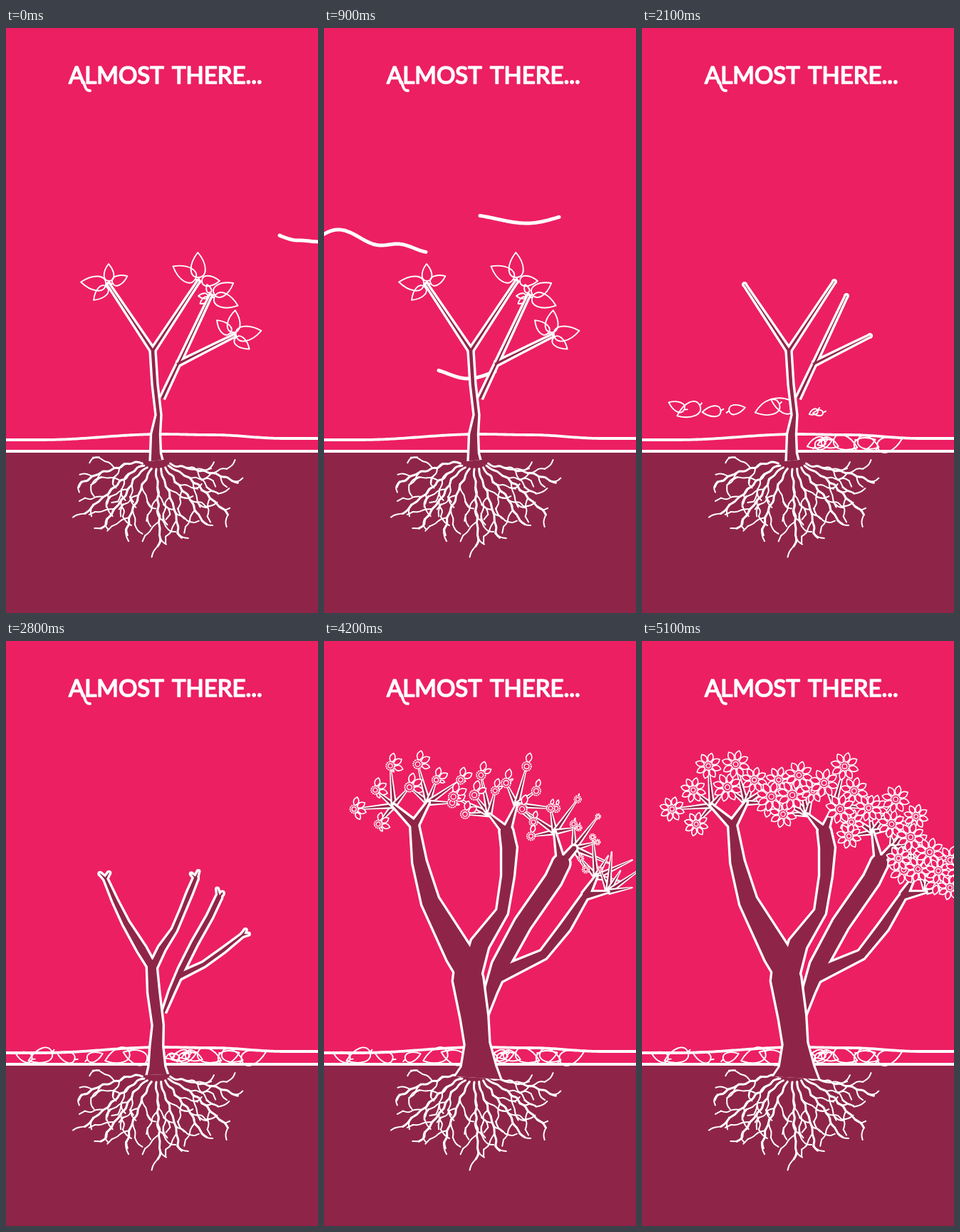
Recreate the animation shown at these times as an HTML page with a canvas. Size 438 px wide and 821 px high, loop 5200 ms.

```html
<!DOCTYPE html>
<html lang="en">
<head>
<meta charset="utf-8">
<title>Almost there</title>
<style>
html, body { margin: 0; width: 100%; height: 100%; overflow: hidden; background: #ec1f63; }
canvas { display: block; }
</style>
</head>
<body>
<canvas id="stage" width="438" height="821"></canvas>
<script>
const c = document.getElementById('stage').getContext('2d');
const PINK = '#ec1f63', SOIL = '#8e2549', WHITE = '#fff';
const LOOP = 5200, STEP = 100, LINE = 3.4, RAD = Math.PI / 180;

const clamp = v => Math.max(0, Math.min(1, v));
const span = (t, a, b) => clamp((t - a) / (b - a));
const lerp = (a, b, k) => a + (b - a) * k;
const mix = (a, b, k) => a.map((v, i) => lerp(v, b[i], k));
const ease = k => k * k * (3 - 2 * k);
const polar = ([x, y], a, d) => [x + Math.cos(a) * d, y + Math.sin(a) * d];

function random(seed) {
  return () => (seed = (seed * 16807) % 2147483647) / 2147483647;
}

function pen(w, color = WHITE) {
  c.lineWidth = w;
  c.strokeStyle = color;
}

function curve(pts) {
  c.beginPath();
  c.moveTo(...pts[0]);
  for (let i = 1; i < pts.length - 1; i++) {
    const [x, y] = pts[i], [nx, ny] = pts[i + 1];
    c.quadraticCurveTo(x, y, (x + nx) / 2, (y + ny) / 2);
  }
  c.lineTo(...pts[pts.length - 1]);
  c.stroke();
}

// ---- Tree: limbs are centre lines of [x, y, width] ----

const straight = (from, to, n) => Array.from({ length: n }, (_, i) => {
  const k = i / (n - 1);
  return [...mix(from, to, k), lerp(7, 4, k)];
});
const limb = (from, to, old) => ({ young: straight(from, to, old.length), old });

// A fork grows out of a limb's end; twigs fan around its tip
function fork({ young, old }, tip, heading, step) {
  const end = young[young.length - 1], root = old[old.length - 1];
  return { young: [end, end], old: [[root[0], root[1], 13], tip], heading, step };
}

const trunk = {
  young: [[211, 607, 18], [210, 597, 15], [210, 570, 13], [214, 543, 8], [209, 500, 8], [206, 453, 8]],
  old: [[216, 613, 66], [217, 597, 50], [215, 565, 36], [211, 528, 40], [202, 474, 44], [200, 452, 34]]
};
const left = limb([206, 453], [144, 360],
  [[205, 475, 30], [190, 440, 40], [149, 365, 27], [134, 310, 21], [127, 258, 13]]);
const right = limb([206, 453], [270, 356],
  [[205, 475, 30], [219, 425, 28], [250, 380, 18], [258, 330, 19], [260, 290, 23], [256, 267, 20]]);
const side = limb([219, 520], [287, 376],
  [[228, 526, 5], [234, 492, 19], [247, 456, 25], [279, 397, 26], [322, 335, 26], [333, 312, 26]]);
const offshoot = limb([240, 472], [320, 432],
  [[243, 470, 22], [308, 440, 15], [339, 401, 17], [367, 357, 11]]);

const sideForks = [
  fork(side, [324, 268, 3], -100, 45), fork(side, [351, 291, 10], -15, 38),
  fork(offshoot, [382, 331, 4], -60, 35), fork(offshoot, [399, 352, 2], -60, 25)
];
const mainForks = [
  fork(left, [98, 231, 5], -140, 45), fork(left, [146, 227, 5], -70, 35),
  fork(right, [232, 243, 2], -128, 26), fork(right, [270, 230, 2], -35, 40)
];

// Five twigs per fork, alternately short and long, each ending in a flower
const rnd = random(77);
const twigs = [...mainForks, ...sideForks].flatMap(({ old, heading, step }) =>
  [-2, -1, 0, 1, 2].map(j => ({
    base: old[1].slice(0, 2),
    tip: polar(old[1], (heading + j * step) * RAD, j % 2 ? 56 : 34),
    r: 17 + rnd() * 4
  })));

function taper(pts, extra) {
  const half = p => Math.max(0, p[2] + extra) / 2;
  const edge = s => pts.map((p, i) => {
    const a = pts[Math.max(0, i - 1)], b = pts[Math.min(pts.length - 1, i + 1)];
    return polar(p, Math.atan2(b[1] - a[1], b[0] - a[0]) + s * Math.PI / 2, half(p));
  });
  const end = pts[pts.length - 1];
  c.beginPath();
  [...edge(1), ...edge(-1).reverse()].forEach(p => c.lineTo(...p));
  c.fill();
  c.beginPath();
  c.arc(end[0], end[1], half(end), 0, 7);
  c.fill();
}

// White silhouette first, then the wood inside, so joined limbs share one outline
function wood(parts, k) {
  const shapes = parts.map(p => p.young.map((v, i) => mix(v, p.old[i], k)));
  for (const [color, extra] of [[WHITE, LINE], [SOIL, -LINE]]) {
    c.fillStyle = color;
    shapes.forEach(s => taper(s, extra));
  }
}

function drawTwig({ base, tip }, k) {
  const end = mix(base, tip, k);
  for (const [color, w] of [[WHITE, 9], [SOIL, 4]]) {
    c.fillStyle = color;
    taper([[...base, w], [...end, color === WHITE ? 2.4 : 0]], 0);
  }
}

// ---- Roots: seeded, wandering and branching ----

const roots = [];
(function growRoots() {
  const rand = random(4242);
  function root(start, aim, len, w, depth) {
    const pts = [start];
    let p = start;
    for (let d = 0, i = 1; d < len; d += 9, i++) {
      const turn = (i % 2 ? 1 : -1) * (0.15 + rand() * 0.45);
      p = polar(p, aim + turn, 9);
      pts.push(p);
      aim = lerp(aim, Math.PI / 2, 0.025);
      if (depth < 2 && i > 2 && i % 2) {
        const out = (i % 4 === 1 ? 1 : -1) * (0.5 + rand() * 0.3);
        root(p, aim + out, (len - d) * 0.3 + 8, 2, depth + 1);
      }
    }
    roots.push({ pts, w });
  }
  const n = 9;
  for (let i = 0; i < n; i++) {
    const a = lerp(168, 12, i / (n - 1)) * RAD;
    const start = [211 + Math.cos(a) * 20, 609 + Math.sin(a) * 10];
    root(start, a, 104 + rand() * 14, 3, 0);
  }
})();

function drawRoots() {
  roots.forEach(({ pts, w }) => {
    pen(w);
    curve(pts);
  });
}

// ---- Leaves: clusters of [direction, length, landing x] ----

const clusters = [
  [[145, 360], [[185, 35, 48], [-92, 24, 25], [-25, 23, 125], [135, 26, 84]]],
  [[270, 355], [[-150, 36, 156], [-91, 35, 181], [0, 25, 255]]],
  [[288, 376], [[-30, 31, 313], [20, 35, 286], [180, 13, 230], [145, 14, 236], [-110, 12, 252]]],
  [[318, 432], [[-135, 26, 244], [-84, 31, 318], [-10, 36, 348], [38, 25, 264]]]
];
const leaves = clusters.flatMap(([tip, list]) =>
  list.map(([dir, len, land], i) => ({ tip, dir, len, land, flip: i % 2 ? 20 : -20 })));

function drawLeaf({ tip, dir, len, land, flip }, t) {
  // the stalk loosens and the leaf sags, then drops; the right-hand ones land first
  const down = Math.sign(Math.cos(dir * RAD));
  const sag = span(t, 1100, 1400);
  const fall = span(t, 1400, land > 240 ? 2100 : 2300);
  const hung = dir + down * 45 * sag;
  const [hx, hy] = polar(tip, hung * RAD, len / 2 + 5 + 3 * sag);
  const lie = (down < 0 ? 180 : 0) + flip;
  const turn = ((lie - hung + 540) % 360 + 360) % 360 - 180;
  const h = len / 2, w = len * 0.57;

  c.save();
  c.translate(lerp(hx, land, fall), lerp(hy, 583, fall));
  c.rotate((hung + turn * fall) * RAD);
  pen(1.9);
  c.beginPath();
  c.moveTo(-h - 4, 2);
  c.lineTo(-h, 0);
  c.bezierCurveTo(-h, -w * 0.7, len * 0.05, -w * 0.65, h, 0);
  c.bezierCurveTo(len * 0.05, w * 0.65, -h, w * 0.7, -h, 0);
  c.stroke();
  c.restore();
}

// ---- Flowers: open from left to right, one petal after another ----

function drawFlower({ tip, r }, t) {
  const age = t - 3770 - tip[0] * 1.1;
  if (age < 0) return;
  c.save();
  c.translate(...tip);
  c.fillStyle = PINK;
  pen(1.6);
  for (let i = 0; i < 8; i++) {
    const k = clamp((age - 30) / 90 - i);
    if (!k) break;
    const l = r * (0.35 + 0.65 * k), w = r * 0.42 * k;
    c.save();
    c.rotate((i * 45 - 75) * RAD);
    c.beginPath();
    c.moveTo(r * 0.28, 0);
    c.quadraticCurveTo(l * 0.65, -w, l, 0);
    c.quadraticCurveTo(l * 0.65, w, r * 0.28, 0);
    c.fill();
    c.stroke();
    c.restore();
  }
  const s = r * (0.6 + 0.4 * clamp(age / 100));
  c.beginPath();
  c.arc(0, 0, s * 0.32, 0, 7);
  c.fill();
  pen(1.9);
  c.lineCap = 'butt';
  c.setLineDash([1.8, 0.9]);
  c.stroke();
  c.setLineDash([]);
  pen(1.3);
  c.beginPath();
  c.arc(0, 0, s * 0.17, 0, 7);
  c.stroke();
  c.restore();
}

// ---- Hill and wind ----

const hill = [[-20, 578], [50, 578], [220, 570], [290, 571], [390, 576], [460, 576]];
const gusts = [
  { path: [[-40, 308], [20, 283], [80, 305], [103, 303], [150, 315], [360, 285], [410, 298], [440, 300]],
    head: 384, speed: 0.6, len: 299 },
  { path: [[200, 262], [285, 274], [370, 258]], head: 813, speed: 0.66, len: 111 },
  { path: [[145, 478], [202, 492], [262, 478]], head: 755, speed: 0.66, len: 79 }
];

function heightAt(pts, x) {
  let i = 0;
  while (i < pts.length - 2 && x > pts[i + 1][0]) i++;
  const [a, b] = [pts[i], pts[i + 1]];
  return lerp(a[1], b[1], (1 - Math.cos(Math.PI * span(x, a[0], b[0]))) / 2);
}

function wave(pts, from, to, w) {
  if (to <= from) return;
  pen(w);
  c.beginPath();
  for (let x = from; x < to; x += 3) c.lineTo(x, heightAt(pts, x));
  c.lineTo(to, heightAt(pts, to));
  c.stroke();
}

function drawTitle() {
  c.font = '33px Lato, "Open Sans", sans-serif';
  c.fillStyle = WHITE;
  pen(1.7);
  for (const [s, x] of [['ALMOST', 88], ['THERE...', 233]]) {
    c.fillText(s, x, 77.5);
    c.strokeText(s, x, 77.5);
  }
  pen(4);
  curve([[109, 76], [112, 87], [118, 88]]);
}

function draw(t) {
  c.lineCap = c.lineJoin = 'round';
  c.fillStyle = PINK;
  c.fillRect(0, 0, 438, 821);
  c.fillStyle = SOIL;
  c.fillRect(0, 595, 438, 226);

  gusts.forEach(({ path, head, speed, len }) => {
    const x = head - speed * t;
    wave(path, Math.max(x, -20), Math.min(x + len, 460), 5);
  });
  wave(hill, -10, 450, 3.8);
  c.fillStyle = WHITE;
  c.fillRect(0, 592, 438, 4);

  leaves.forEach(l => drawLeaf(l, t));
  drawRoots();

  const sprout = ease(span(t, 3200, 3900));
  if (sprout > 0) twigs.forEach(w => drawTwig(w, sprout));
  const grow = ease(span(t, 2600, 3200));
  wood([side, offshoot, ...sideForks], grow);
  wood([trunk, left, right, ...mainForks], grow);
  twigs.forEach(w => drawFlower(w, t));
  drawTitle();
}

const start = performance.now();
function tick() {
  const t = (performance.now() - start) % LOOP;
  draw(Math.floor(t / STEP) * STEP);
  requestAnimationFrame(tick);
}
tick();
</script>
</body>
</html>
```
